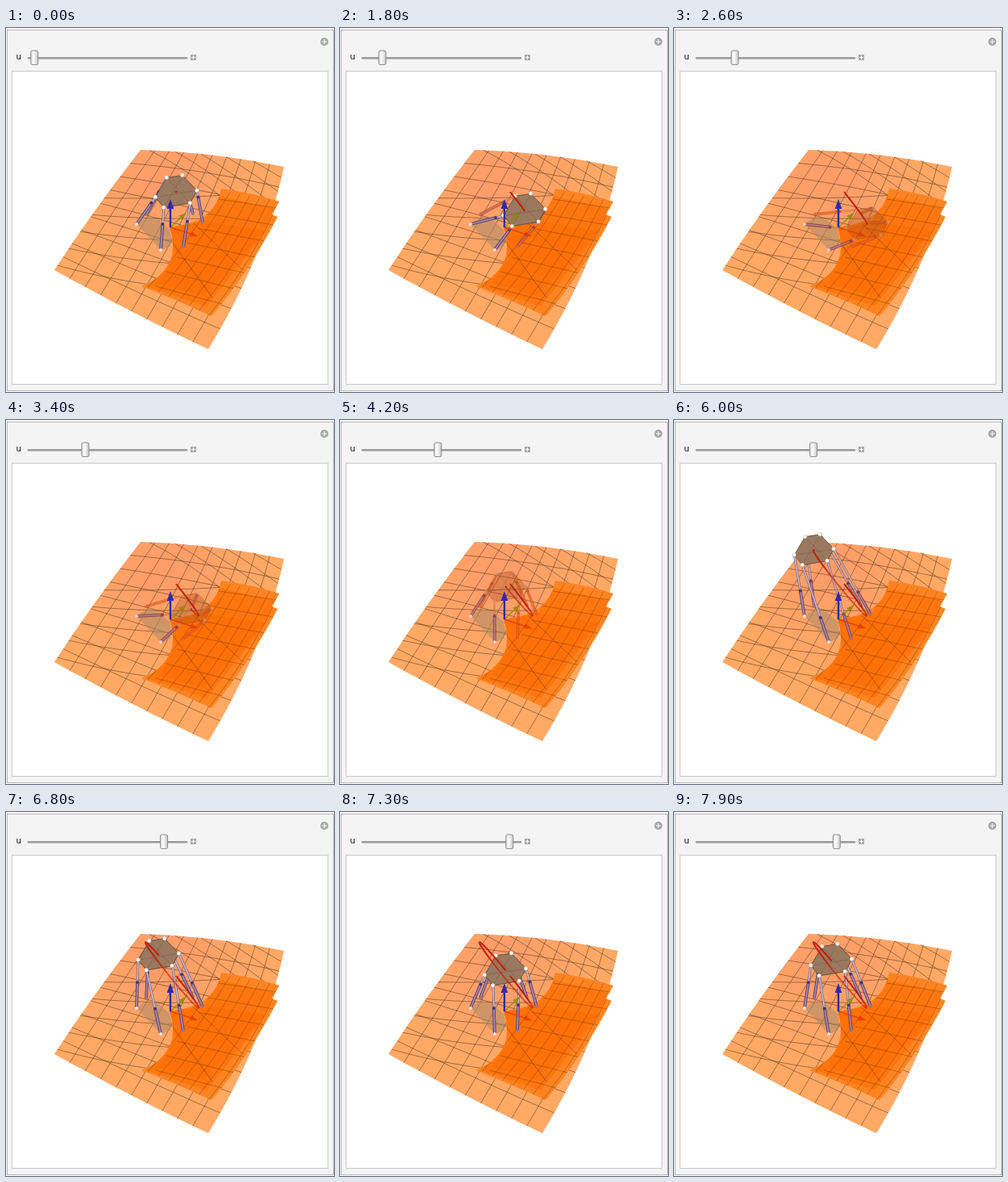
Animation, 407 px wide and 451 px high, one loop 8 s. Source, as an HTML page with a canvas:

```html
<!DOCTYPE html>
<html lang="en">
<head>
<meta charset="utf-8">
<title>Moving platform</title>
<style>
  html, body { margin: 0; width: 100%; height: 100%; overflow: hidden; background: #fff; }
  canvas { display: block; width: 407px; height: 451px; }
</style>
</head>
<body>
<canvas id="stage"></canvas>
<script>
const W = 407, H = 451, LOOP = 8000;
const stage = document.getElementById('stage');
const ratio = window.devicePixelRatio || 1;
const g = stage.getContext('2d');
const backdrop = document.createElement('canvas');
for (const c of [stage, backdrop]) { c.width = W * ratio; c.height = H * ratio; }

const clamp = v => Math.max(0, Math.min(1, v));
const lerp = (a, b, k) => a + (b - a) * k;
const between = (p, q, k) => [lerp(p[0], q[0], k), lerp(p[1], q[1], k)];
const mix = (a, b, k) => `rgb(${a.map((v, i) => Math.round(lerp(v, b[i], k)))})`;

function stroke(c, points, color, width) {
  c.beginPath();
  points.forEach(p => c.lineTo(...p));
  c.strokeStyle = color;
  c.lineWidth = width;
  c.stroke();
}

function fill(c, points, color) {
  c.beginPath();
  points.forEach(p => c.lineTo(...p));
  c.closePath();
  c.fillStyle = color;
  c.fill();
}

function dot(c, [x, y], r, color) {
  c.beginPath();
  c.arc(x, y, r, 0, 7);
  c.fillStyle = color;
  c.fill();
}

function plus(c, x, y, r) {
  stroke(c, [[x - r, y], [x + r, y]], '#fff', 1);
  stroke(c, [[x, y - r], [x, y + r]], '#fff', 1);
}

// ---- Static scene ----
const corner = { tl: [167, 151], tr: [345, 172], br: [251, 398], bl: [60, 300] };

function sheet(s, t) {
  const p = between(between(corner.tl, corner.tr, s), between(corner.bl, corner.br, s), t);
  const side = 4 * t * (1 - t), top = 4 * s * (1 - s);
  return [p[0] - 2.5 * side * (1 - s) + 11 * side * s, p[1] - 4 * top * (1 - t) + 2 * top * t];
}

function sheetLine(c, from, to) {
  const line = Array.from({ length: 17 }, (_, i) => sheet(...between(from, to, i / 16)));
  stroke(c, line, 'rgba(62,44,28,.7)', .7);
}

function drawChrome(c) {
  c.fillStyle = '#fff';
  c.fillRect(0, 0, W, H);
  c.fillStyle = '#f4f4f4';
  c.fillRect(1, 2, 405, 447);
  c.lineWidth = 1;
  c.strokeStyle = '#b4b4b4';
  c.strokeRect(1.5, 2.5, 405, 447);
  c.fillStyle = '#fff';
  c.fillRect(7, 53, 393, 389);
  c.strokeStyle = '#c8c8c8';
  c.strokeRect(7.5, 53.5, 392, 388);

  dot(c, [395, 17], 5, '#a6a6a6');
  plus(c, 395, 17, 3);
  c.fillStyle = '#a8a8a8';
  c.fillRect(229, 33, 7, 7);
  plus(c, 232.5, 36.5, 2.5);
  c.lineCap = 'round';
  stroke(c, [[28, 37.2], [224, 37.2]], '#999', 2.6);
  c.lineCap = 'butt';
  c.fillStyle = '#111';
  c.font = '10px "DejaVu Sans", sans-serif';
  c.fillText('u', 12.5, 39);
}

function drawLightSheet(c) {
  const n = 16, edge = [];
  for (let i = 0; i <= n; i++) edge.push(sheet(i / n, 0));
  for (let i = 0; i <= n; i++) edge.push(sheet(1, i / n));
  for (let i = n; i >= 0; i--) edge.push(sheet(i / n, 1));
  for (let i = n; i >= 0; i--) edge.push(sheet(0, i / n));
  const tone = c.createRadialGradient(195, 185, 10, 195, 185, 130);
  tone.addColorStop(0, '#ff9d69');
  tone.addColorStop(1, '#ffa964');
  fill(c, edge, tone);
  for (let i = 1; i < 10; i++) sheetLine(c, [i / 10, 0], [i / 10, 1]);
  for (let i = 1; i < 9; i++) sheetLine(c, [0, i / 9], [1, i / 9]);
  for (let i = 0; i < 5; i++) {
    sheetLine(c, [.06 + i * .18, 0], [1, .36 - i * .075]);
    sheetLine(c, [0, .4 + i * .14], [.75, .2 + i * .14]);
  }
}

function darkOutline(c) {
  c.beginPath();
  c.moveTo(267, 199);
  c.quadraticCurveTo(305, 204, 339, 215);
  c.lineTo(330, 231);
  c.lineTo(337, 234);
  c.quadraticCurveTo(301, 303, 255, 357);
  c.quadraticCurveTo(210, 336, 168, 320);
  c.bezierCurveTo(193, 311, 217, 288, 203, 247);
  c.bezierCurveTo(229, 243, 260, 237, 267, 199);
}

function drawDarkSheets(c) {
  fill(c, [[162, 243], [174, 234], [188, 236], [203, 250], [206, 264], [203, 271], [192, 275]],
    'rgba(170,138,102,.55)');
  c.save();
  darkOutline(c);
  c.clip();
  c.fillStyle = '#ff8421';
  c.fillRect(160, 190, 190, 180);
  fill(c, [[260, 207], [334, 224], [314, 263], [249, 345], [174, 320], [208, 285], [203, 247], [246, 239]],
    '#ff760f');
  fill(c, [[248, 240], [322, 251], [245, 332], [190, 316], [211, 280], [204, 248]], '#ff7008');
  const line = 'rgba(88,38,4,.5)';
  for (let i = 0; i < 7; i++) {
    const k = i / 6;
    c.beginPath();
    c.moveTo(266 + 73 * k, 201 + 14 * k);
    c.quadraticCurveTo(224 + 80 * k, 268 + 24 * k, 176 + 76 * k, 322 + 34 * k);
    c.strokeStyle = line;
    c.lineWidth = .7;
    c.stroke();
  }
  for (let i = 0; i < 7; i++) {
    const y = 210 + i * 18;
    stroke(c, [[264 - i * 13, y + 2], [342 - i * 11, y + 14 + i * 2]], line, .7);
  }
  stroke(c, [[205, 264], [256, 334]], line, .9);
  stroke(c, [[233, 242], [294, 300]], line, .8);
  c.restore();
}

const still = backdrop.getContext('2d');
still.scale(ratio, ratio);
drawChrome(still);
drawLightSheet(still);
drawDarkSheets(still);

// ---- Moving parts ----
const plate = [[-11.5, -17.5], [8, -20.5], [26, -1.5], [17.5, 14], [-15, 19.5], [-25.5, 6.5]];
const feet = [[174, 231], [232, 230], [244, 241], [220, 271], [192, 275], [162, 243]];
const SLEEVE = 32;

const center = u => [
  206 + 5 * Math.cos(u) + 33 * Math.sin(u),
  202 + Math.cos(u) + 41 * Math.sin(u)
];
const buried = u => clamp((Math.cos(u - 2.2) - .1) * 2.2);
const rearBuried = u => clamp((Math.cos(u - 2.5) + .8) * 1.4);

function drawLeg(foot, joint, cover, front) {
  const length = Math.hypot(joint[0] - foot[0], joint[1] - foot[1]);
  const top = between(foot, joint, Math.min(.85, SLEEVE / length));
  g.globalAlpha = 1 - .6 * cover;
  stroke(g, [top, joint], mix([110, 92, 128], [190, 76, 32], cover), 2.8);
  stroke(g, [top, joint], mix([206, 192, 212], [255, 152, 100], cover), 1.5);
  const sleeveCover = front ? cover * .4 : cover;
  g.globalAlpha = 1 - .5 * sleeveCover;
  stroke(g, [foot, top], mix([94, 68, 112], [200, 62, 20], sleeveCover), 3.8);
  stroke(g, [foot, top], mix([172, 138, 178], [240, 112, 62], sleeveCover), 1.7);
  dot(g, top, 2, mix([72, 56, 112], [196, 70, 28], sleeveCover));
  dot(g, foot, 2, front ? '#eee4e6' : mix([160, 116, 142], [230, 92, 40], cover));
  g.globalAlpha = 1;
}

function drawPlate(joints, cover) {
  g.globalAlpha = 1 - .65 * cover;
  fill(g, joints, mix([154, 121, 94], [168, 78, 26], cover));
  g.globalAlpha = .75 - .4 * cover;
  for (let i = 0; i < 3; i++) stroke(g, [joints[i], joints[i + 3]], '#6e5744', .6);
  stroke(g, [...joints, joints[0]], mix([75, 64, 56], [150, 50, 16], cover), 1);
  g.globalAlpha = 1 - .75 * cover;
  for (const p of joints) {
    dot(g, p, 2.7, '#a59a9c');
    dot(g, [p[0] - .2, p[1] - .3], 2.2, mix([252, 248, 248], [255, 176, 130], cover));
  }
  g.globalAlpha = 1;
}

function drawArrow(from, to, color, width, head) {
  const angle = Math.atan2(to[1] - from[1], to[0] - from[0]);
  const wing = side => [
    to[0] - head * Math.cos(angle) - side * head * .36 * Math.sin(angle),
    to[1] - head * Math.sin(angle) + side * head * .36 * Math.cos(angle)
  ];
  stroke(g, [from, between(wing(1), wing(-1), .5)], color, width);
  fill(g, [to, wing(1), wing(-1)], color);
}

function drawAxes() {
  const origin = [204, 247];
  g.globalAlpha = .85;
  drawArrow(origin, [238, 258], '#e03a08', 1.4, 9);
  drawArrow(origin, [223, 229], '#8f8a00', 1.5, 9);
  g.globalAlpha = 1;
  drawArrow(origin, [204, 212], '#3029ac', 2.4, 12);
}

function drawTrail(u) {
  for (let v = 0; v < u - .01; v += .1) {
    g.globalAlpha = 1 - .4 * buried(v);
    stroke(g, [center(v), center(v + .11)], '#c21f0b', 2);
  }
  g.globalAlpha = 1;
  dot(g, center(u), 1.3, '#b52a16');
}

function drawThumb(u) {
  const x = 35.3 + u * 28.7;
  const shade = g.createLinearGradient(x - 5, 0, x + 5, 0);
  shade.addColorStop(0, '#d2d2d2');
  shade.addColorStop(.4, '#fff');
  shade.addColorStop(1, '#bdbdbd');
  g.beginPath();
  g.roundRect(x - 4.5, 28, 9, 17.5, 2);
  g.fillStyle = shade;
  g.fill();
  g.strokeStyle = '#8c8c8c';
  g.lineWidth = 1;
  g.stroke();
}

// Holds at rest, climbs 62 steps, pauses one step, then turns back.
function parameterAt(t) {
  const step = Math.max(0, Math.floor((t - 1200) / 100));
  return (step <= 62 ? step : 125 - step) / 10;
}

function draw(u) {
  const [x, y] = center(u);
  const scale = .97 + .04 * Math.cos(u - .6);
  const joints = plate.map(p => [x + p[0] * scale, y + p[1] * scale]);
  const cover = buried(u);
  const rearCover = Math.max(cover, rearBuried(u));
  g.setTransform(1, 0, 0, 1, 0, 0);
  g.drawImage(backdrop, 0, 0);
  g.scale(ratio, ratio);
  drawThumb(u);
  feet.forEach((foot, i) => {
    const front = i > 3;
    drawLeg(foot, joints[i], front ? cover : rearCover, front);
  });
  drawPlate(joints, cover);
  drawAxes();
  drawTrail(u);
}

const start = performance.now();
function tick() {
  draw(parameterAt((performance.now() - start) % LOOP));
  requestAnimationFrame(tick);
}
tick();
</script>
</body>
</html>
```
